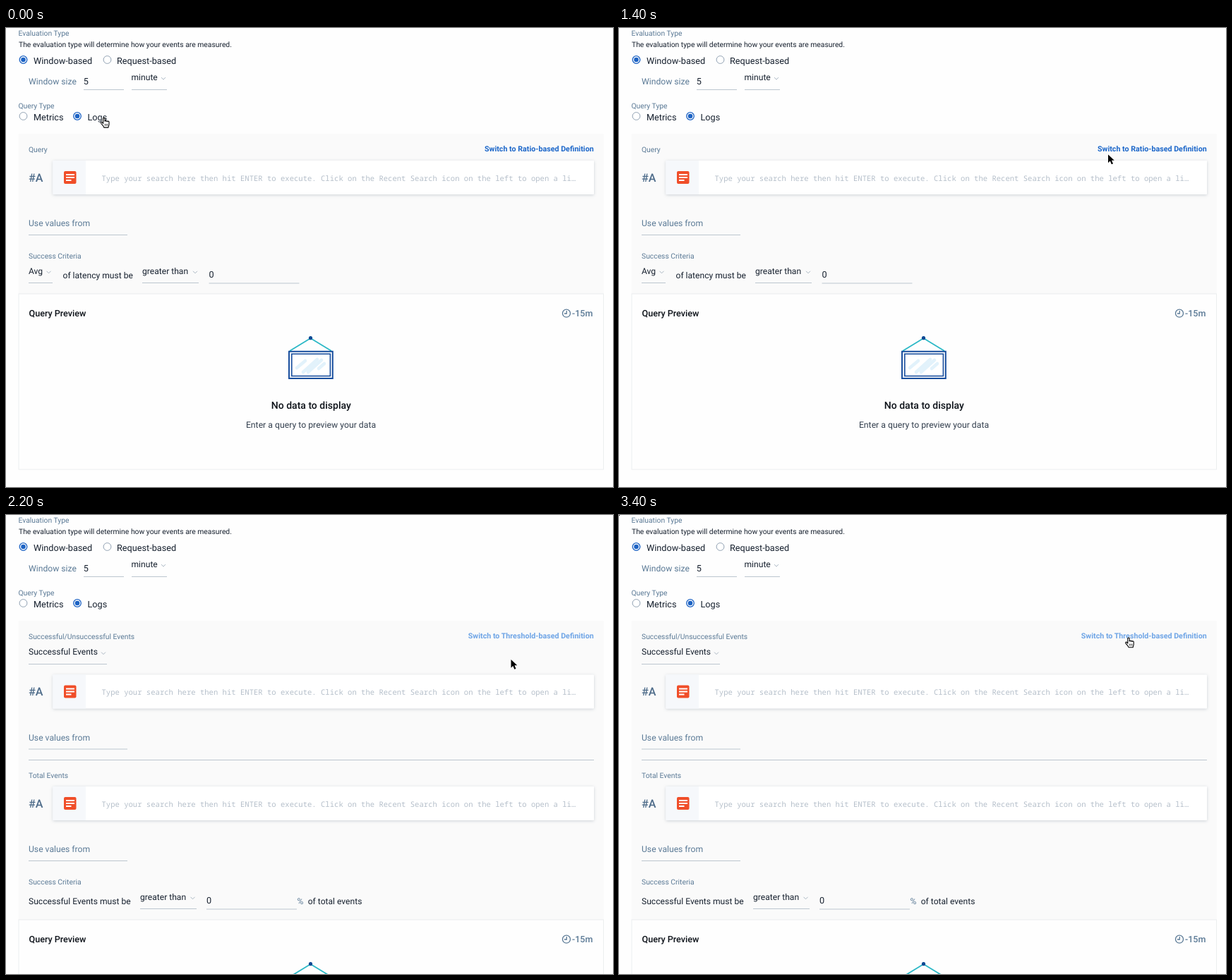
Animation, 860 px wide and 651 px high, one loop 3.6 s. Source, as an HTML page:

```html
<!DOCTYPE html>
<html lang="en">
<head>
<meta charset="utf-8">
<title>Query definition form</title>
<style>
html, body { margin: 0; width: 100%; height: 100%; overflow: hidden; background: #fefefe; }
svg { display: block; width: 860px; height: 651px; font-family: Roboto, "Liberation Sans", sans-serif; text-rendering: geometricPrecision; }
text { white-space: pre; fill: #17212f; font-size: 12.1px; }
.label { font-size: 10.33px; fill: #5b7a96; }
.note { font-size: 10.35px; }
.radio { font-size: 12.7px; }
.soft { font-size: 12.15px; fill: #5b7a96; }
.tag { font-size: 16.1px; font-weight: 500; fill: #4d6b89; }
.hint { font: 10.57px "Noto Sans Mono", "DejaVu Sans Mono", monospace; fill: #b5bfca; }
.link { font-size: 10.7px; font-weight: 700; text-anchor: end; }
.head { font-size: 12.6px; font-weight: 500; fill: #0c1118; }
.time { font-size: 12.6px; font-weight: 500; fill: #5b7a96; text-anchor: end; }
.empty { font-size: 14px; font-weight: 500; fill: #0c1118; text-anchor: middle; }
.sub { font-size: 12.25px; fill: #333f4e; text-anchor: middle; }
.rule { stroke: #bcc6cf; stroke-width: 1; }
.chev { fill: none; stroke: #a9b6c2; stroke-width: 1; }
.box { filter: drop-shadow(0 1px 2px rgba(70, 90, 110, .25)); }
</style>
</head>
<body>
<svg id="stage" viewBox="0 0 860 651" xmlns="http://www.w3.org/2000/svg"></svg>
<script>
const text = (x, y, s, cls = "") => `<text x="${x}" y="${y}" class="${cls}">${s}</text>`;
const rect = (x, y, w, h, fill, more = "") =>
  `<rect x="${x}" y="${y}" width="${w}" height="${h}" fill="${fill}" ${more}/>`;
const rule = (x1, x2, y) => `<path class="rule" d="M${x1} ${y}H${x2}"/>`;
const chevron = (x, y) => `<path class="chev" d="M${x - 3} ${y - 1.4}l3 3 3-3"/>`;
const move = (x, y, body) => `<g transform="translate(${x} ${y})">${body}</g>`;

const radio = (x, y, on) => on
  ? `<circle cx="${x}" cy="${y}" r="5.3" fill="#fff" stroke="#1d63c4" stroke-width="1.3"/>
     <circle cx="${x}" cy="${y}" r="3.3" fill="#1d63c4"/>`
  : `<circle cx="${x}" cy="${y}" r="5.4" fill="#fff" stroke="#91a2b3"/>`;

const hint = "Type your search here then hit ENTER to execute. " +
  "Click on the Recent Search icon on the left to open a li…";

// One search row, with its value picker below.
const searchRow = y => move(0, y,
  text(32, 29.6, "#A", "tag") +
  `<g class="box">${rect(66.5, 0, 766.5, 48, "#fff", 'rx="1"')}</g>` +
  rect(66.5, 0, 46.5, 48, "#f6f8fb") +
  rect(82, 15, 17.5, 18, "#f04e29", 'rx="2"') +
  '<path d="M85 20H97M85 24H97M85 28H92.5" stroke="#fff" stroke-width="1.9"/>' +
  text(135.5, 28.5, hint, "hint") +
  text(32, 93, "Use values from", "soft") + rule(32, 172, 105.5));

const picture =
  `<path d="M402 458L431.5 440L461 458" fill="none" stroke="#2bb8c6" stroke-width="1.8"/>
   <circle cx="431.5" cy="439.7" r="2.6" fill="#0c4a94"/>
   <rect x="401" y="458.8" width="61.8" height="38.2" fill="#fff" stroke="#1a4f9e" stroke-width="2"/>
   <rect x="404.8" y="462.3" width="54.6" height="31.3" fill="#fff" stroke="#1a4f9e" stroke-width="1.6"/>
   <path d="M412 482L424 472M421 488L441 470M428 488L447 471M443 483L451 476" stroke="#e2f2fb" stroke-width="4.6" stroke-linecap="round"/>`;

const preview =
  rect(18, 377, 828.5, 249, "#fefefe", 'stroke="#eceeef"') +
  text(32.5, 409.3, "Query Preview", "head") +
  `<g fill="none" stroke="#5b7a96" stroke-width="1.3"><circle cx="794" cy="404.7" r="5.5"/>
   <path d="M794.3 401V405H791"/></g>` +
  text(831.5, 408.8, "-15m", "time") + picture +
  text(432.3, 540.3, "No data to display", "empty") +
  text(432, 566.6, "Enter a query to preview your data", "sub");

const header =
  text(17.5, 10.6, "Evaluation Type", "label") +
  text(18, 26.6, "The evaluation type will determine how your events are measured.", "note") +
  radio(24.5, 45, true) + text(39, 51, "Window-based", "radio") +
  radio(143.5, 45, false) + text(157, 51, "Request-based", "radio") +
  text(32, 80.3, "Window size", "soft") +
  text(109.8, 79.8, "5", "radio") + rule(110, 167, 87.5) +
  text(177.5, 74.3, "minute") + chevron(223, 71.5) + rule(178, 228, 87.5) +
  text(17.5, 113.6, "Query Type", "label") +
  radio(24.5, 125, false) + text(39, 131.2, "Metrics", "radio") +
  radio(101, 125, true) + text(115.5, 131.2, "Logs", "radio");

const threshold =
  rect(17.5, 150.5, 829.5, 227, "#fafafa") +
  text(32, 176, "Query", "label") + searchRow(188) +
  text(32, 326.6, "Success Criteria", "label") +
  text(32, 349, "Avg") + chevron(60.5, 346.2) + rule(32, 66, 361.5) +
  text(80.5, 354.6, "of latency must be") +
  text(193, 349, "greater than") + chevron(268, 346.2) + rule(193, 273, 361.5) +
  text(287.5, 354, "0", "radio") + rule(287.5, 415.5, 362) + preview;

const ratio =
  rect(17.5, 150.5, 829.5, 424, "#fafafa") +
  text(32, 176, "Successful/Unsuccessful Events", "label") +
  text(32, 198.3, "Successful Events") + chevron(138, 196) + rule(32, 143, 211.5) +
  searchRow(226.5) + rule(32, 833, 347.5) +
  text(32, 373.3, "Total Events", "label") + searchRow(385) +
  text(32, 523.6, "Success Criteria", "label") +
  text(32, 551.6, "Successful Events must be") +
  text(190, 546, "greater than") + chevron(264.5, 543.2) + rule(190, 270, 558.5) +
  text(284, 551, "0", "radio") + rule(284, 412, 559) +
  text(412.5, 551.6, "%", "soft") + text(427.7, 551.6, "of total events") +
  move(0, 197, preview);

const arrow =
  `<path d="M.5 .5V12.2L3.3 9.6L5.3 14.3L7.5 13.4L5.5 8.8H9.3Z" fill="#000" stroke="#fff" stroke-width="1" paint-order="stroke"/>`;
const hand =
  `<path d="M3.8 8.6V1.8a1.2 1.2 0 0 1 2.4 0V5.5a1.1 1.1 0 0 1 2.1 .1a1.1 1.1 0 0 1 2 .4a1 1 0 0 1 1.9 .6V10c0 1.5-1 2-1 4.3H5C4.8 12.5 2.4 10.6 .9 8.4C.1 7.1 1.5 6.1 2.5 7.1Z"
   fill="#fff" stroke="#000" stroke-width="1.1" stroke-linejoin="round"/>
   <path d="M6.4 9.2v2.8M8.2 9.2v2.8M10 9.2v2.8" stroke="#000" stroke-width=".7"/>`;

const stage = document.getElementById("stage");
stage.innerHTML = rect(0, 0, 860, 651, "#fefefe") + header +
  `<g id="threshold">${threshold}</g><g id="ratio">${ratio}</g>
   <text id="link" class="link" x="832.7" y="175.3"></text>
   <rect id="dot" width="1" height="1" fill="#000"/>
   <g id="arrow">${arrow}</g><g id="hand">${hand}</g>`;
const get = id => document.getElementById(id);
const show = (id, on) => get(id).setAttribute("visibility", on ? "visible" : "hidden");

const STEP = 200, LOOP = 3600, SWITCH = 2200;
// Pointer stops: start time, x, y, shape.
const stops = [
  [0, 133.8, 126.8, "hand"], [400, 165, 134, "arrow"], [600, 478, 171, "arrow"],
  [800, 618.5, 178, "arrow"], [1000, 660, 179, "arrow"], [1200, 685, 179, "arrow"],
  [1400, 692.5, 179, "arrow"], [1600, 702, 173, "hand"], [1800, 703, 174, "hand"],
  [2000, 704, 197.4, "hand"], [2200, 715, 204.5, "arrow"],
  [3000, 718.5, 187, "arrow"], [3200, 717, 173.5, "hand"]
];

function draw(now) {
  const t = Math.floor((now % LOOP) / STEP) * STEP;
  const [, x, y, shape] = stops.filter(s => s[0] <= t).pop();
  const switched = t >= SWITCH;
  show("threshold", !switched);
  show("ratio", switched);
  show("dot", t >= 2400);
  for (const id of ["arrow", "hand"]) show(id, id === shape);
  get(shape).setAttribute("transform", `translate(${x} ${y})`);
  const link = get("link");
  link.textContent = `Switch to ${switched ? "Threshold" : "Ratio"}-based Definition`;
  link.style.fill = switched ? "#6fa5e6" : t >= 1600 ? "#0b4a9a" : "#1b66c9";
}

function tick() {
  draw(performance.now());
  requestAnimationFrame(tick);
}
tick();
</script>
</body>
</html>
```
